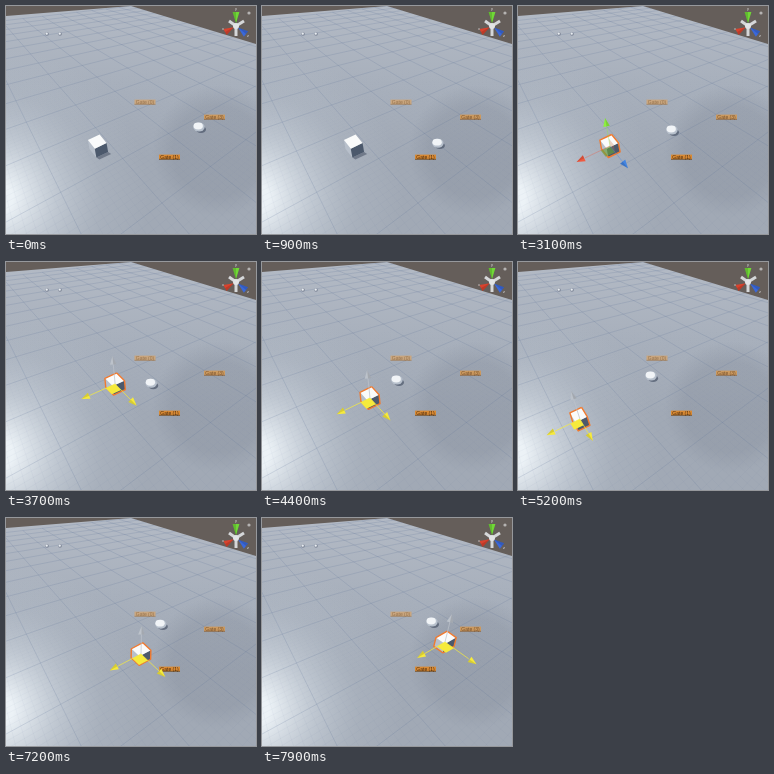
These frames come from a looping animation (250x228 px, 8000 ms). An HTML page with a canvas:

```html
<!DOCTYPE html>
<html>
<head>
<meta charset="utf-8">
<style>
html, body { margin: 0; width: 100%; height: 100%; overflow: hidden; background: #655e5a; }
canvas { display: block; width: 100vw; height: 100vh; }
</style>
</head>
<body>
<canvas id="stage"></canvas>
<script>
const W = 250, H = 228, LOOP = 8000, STEP = 100;
const SELECT_TIME = 2100, DRAG_TIME = 3100;
const YELLOW = '#f6ea3c';
const canvas = document.getElementById('stage');
const ctx = canvas.getContext('2d');

// Ground perspective: a base point and the vanishing points of both grid axes.
const BASE = [92, 140], VX = [470, -40], VZ = [-60, -48];
const FAR_U = 1.147, FAR_V = 1.961;

// Waypoints: [ms, x, y]
const BALL_PATH = [[0, 193, 121], [1000, 174, 139], [2000, 174, 139], [2100, 170, 143.5],
  [3100, 154, 124], [4400, 135, 118], [6100, 131, 109.5], [7900, 170, 104]];
const CUBE_PATH = [[3100, 92, 140], [3800, 112, 119], [4400, 108, 136], [5650, 36, 169],
  [6500, 76, 151], [7200, 135, 136], [7400, 163, 128], [7900, 183, 124]];

const add = (p, d, k = 1) => [p[0] + d[0] * k, p[1] + d[1] * k];
const resize = (d, length) => add([0, 0], d, length / Math.hypot(...d));
const awayFrom = (vp, p) => resize(add(p, vp, -1), 1);

function along(path, t) {
  const i = path.findIndex(k => k[0] >= t);
  if (i <= 0) return path[0].slice(1);
  const [t0, ...p0] = path[i - 1], [t1, ...p1] = path[i];
  return add(p0, add(p1, p0, -1), (t - t0) / (t1 - t0));
}

function ground(u, v) {
  const w = 1 + u + v;
  return [0, 1].map(i => (BASE[i] + u * VX[i] + v * VZ[i]) / w);
}

function trace(points) {
  ctx.beginPath();
  points.forEach(p => ctx.lineTo(...p));
}
function fill(points, color) {
  trace(points);
  ctx.fillStyle = color;
  ctx.fill();
}
function line(points, color, width = 1) {
  trace(points);
  ctx.strokeStyle = color;
  ctx.lineWidth = width;
  ctx.stroke();
}
function disc(x, y, rx, ry, color) {
  ctx.beginPath();
  ctx.ellipse(x, y, rx, ry, 0, 0, 7);
  ctx.fillStyle = color;
  ctx.fill();
}
function quad(p, a, b, color) {
  fill([p, add(p, a), add(add(p, a), b), add(p, b)], color);
}
function cone(tip, dir, length, half, color) {
  const d = resize(dir, 1), side = [-d[1], d[0]], back = add(tip, d, -length);
  fill([tip, add(back, side, half), add(back, side, -half)], color);
  fill([tip, add(back, side, half), back], 'rgba(0,0,0,.13)');
}
function text(string, x, y, color, size = 5) {
  ctx.font = `${size}px "Liberation Sans", sans-serif`;
  ctx.textAlign = 'center';
  ctx.textBaseline = 'middle';
  ctx.fillStyle = color;
  ctx.fillText(string, x, y);
}
function wash(gradient, ...colors) {
  colors.forEach((c, i) => gradient.addColorStop(i / (colors.length - 1), c));
  return gradient;
}

function drawGrid() {
  const major = 'rgba(92,110,150,.24)';
  const minor = wash(ctx.createLinearGradient(0, 50, 0, H), 'rgba(92,110,150,0)', 'rgba(92,110,150,.1)');
  for (let i = 0; i < 160; i++) {
    const u = FAR_U - i * .01401, v = FAR_V - i * .01707;
    const style = i % 10 ? [minor, .5] : [major, .8];
    if (u > -.3) line([ground(u, FAR_V), ground(u, -.5 - u)], ...style);
    line([ground(FAR_U, v), ground(-.5 - v, v)], ...style);
  }
}

function drawGround() {
  ctx.fillStyle = '#655e5a';
  ctx.fillRect(0, 0, W, H);
  ctx.save();
  trace([[0, 10], [125, 0], [W, 38], [W, H], [0, H]]);
  ctx.clip();
  const layers = [
    wash(ctx.createLinearGradient(0, 0, 0, H), '#b3bac5', '#a8b0bc', '#a1a9b5', '#a1a9b5'),
    wash(ctx.createRadialGradient(-8, 192, 15, -8, 192, 150),
      'rgba(240,246,250,.95)', 'rgba(215,223,231,.55)', 'rgba(195,204,214,.2)', 'rgba(195,204,214,0)'),
    wash(ctx.createRadialGradient(212, 145, 45, 212, 145, 66), 'rgba(130,138,152,.3)', 'rgba(130,138,152,0)')
  ];
  for (const layer of layers) {
    ctx.fillStyle = layer;
    ctx.fillRect(0, 0, W, H);
  }
  drawGrid();
  ctx.restore();
}

function drawLabel(x, y, string, color, ink) {
  ctx.fillStyle = color;
  ctx.fillRect(x - 10.5, y - 2.4, 21, 4.8);
  line([[x - 10.5, y + 2.3], [x + 10.5, y + 2.3]], ink, .6);
  text(string, x, y + .2, ink);
}

function drawCompass() {
  const center = [230, 20];
  const arm = (dx, dy, color) =>
    cone(add(center, [dx, dy], .2), [-dx, -dy], Math.hypot(dx, dy) * .8, 3.4, color);
  for (const end of [[0, 10], [8, -5], [-7, -5]]) line([center, add(center, end)], '#d5d7d9', 3);
  arm(0, -14, '#70d836');
  arm(-11, 6, '#d8432e');
  arm(10, 8, '#3a68da');
  disc(...center, 3, 3, '#e2e4e6');
  text('y', 230, 3, '#ddd', 4);
  text('x', 217, 23, '#ddd', 4);
  text('z', 242, 30, '#ddd', 4);
  disc(243, 7, 1.6, 1.6, '#b5b3b2');
}

function drawIcons() {
  for (const x of [41, 54]) {
    disc(x, 28, 1.9, 1.7, '#7d8696');
    disc(x - .3, 27.7, 1.2, 1.1, '#e8ecf0');
  }
}

function drawBall([x, y]) {
  disc(x + 2, y + 2.5, 5, 3.4, 'rgba(68,79,98,.65)');
  disc(x, y, 5.7, 4.5, '#b7c0cc');
  disc(x - .8, y - 1, 4.7, 3.4, '#f1f4f7');
}

function drawCube(center, up, selected) {
  const a = resize(awayFrom(VX, center), 13), b = resize(awayFrom(VZ, center), 11), down = resize(up, -9);
  const top = add(center, add(add(a, b), down), -.5);
  const left = add(top, a), right = add(top, b), front = add(left, b);
  if (!selected) quad(add(front, down), add(right, front, -1), [3, 2], 'rgba(60,70,90,.5)');
  quad(left, b, down, '#b8c0cb');
  quad(right, a, down, '#4c596c');
  quad(top, a, b, '#fafbfb');
  if (!selected) return;
  ctx.lineJoin = 'round';
  line([top, left, add(left, down), add(front, down), add(right, down), right, top], '#f07a30', 1.4);
}

function drawHandles(p, up, dragging) {
  const x = resize(awayFrom(VX, p), 37 - Math.max(0, p[0] - 108) * .065);
  const z = resize(awayFrom(VZ, p), 25 + (p[0] - 59) * .11);
  const plane = (a, b, color) => quad(p, add([0, 0], a, .28), add([0, 0], b, .28), color);
  plane(x, z, dragging ? YELLOW : 'rgba(105,160,60,.65)');
  if (!dragging) plane(z, up, 'rgba(200,110,70,.3)');
  const arrow = (d, color) => {
    ctx.globalAlpha = dragging ? .9 : .45;
    line([p, add(p, d, .75)], color, .8);
    ctx.globalAlpha = 1;
    cone(add(p, d), d, 8.5, 3.3, color);
  };
  arrow(up, dragging ? '#bcc2ca' : '#8df03f');
  arrow(x, dragging ? YELLOW : '#f05a40');
  arrow(z, dragging ? YELLOW : '#4385e2');
}

function draw(t) {
  const ratio = devicePixelRatio || 1;
  const w = Math.round(innerWidth * ratio), h = Math.round(innerHeight * ratio);
  if (canvas.width !== w || canvas.height !== h) {
    canvas.width = w;
    canvas.height = h;
  }
  ctx.setTransform(w / W, 0, 0, h / H, 0, 0);
  drawGround();
  drawIcons();
  drawCompass();
  const cube = along(CUBE_PATH, t), selected = t >= SELECT_TIME;
  const up = [(cube[0] - 130) * .13, -28];
  drawBall(along(BALL_PATH, t));
  drawCube(cube, up, selected);
  drawLabel(139, 96, 'Gate (0)', '#c9a67f', '#94714c');
  drawLabel(208.5, 111, 'Gate (3)', '#cc9a60', '#75502c');
  drawLabel(163.5, 151, 'Gate (1)', '#d98a34', '#472a0e');
  if (selected) drawHandles(cube, up, t > DRAG_TIME);
}

const start = performance.now();
function tick() {
  const t = (performance.now() - start) % LOOP;
  draw(Math.floor(t / STEP) * STEP);
  requestAnimationFrame(tick);
}
tick();
</script>
</body>
</html>
```
